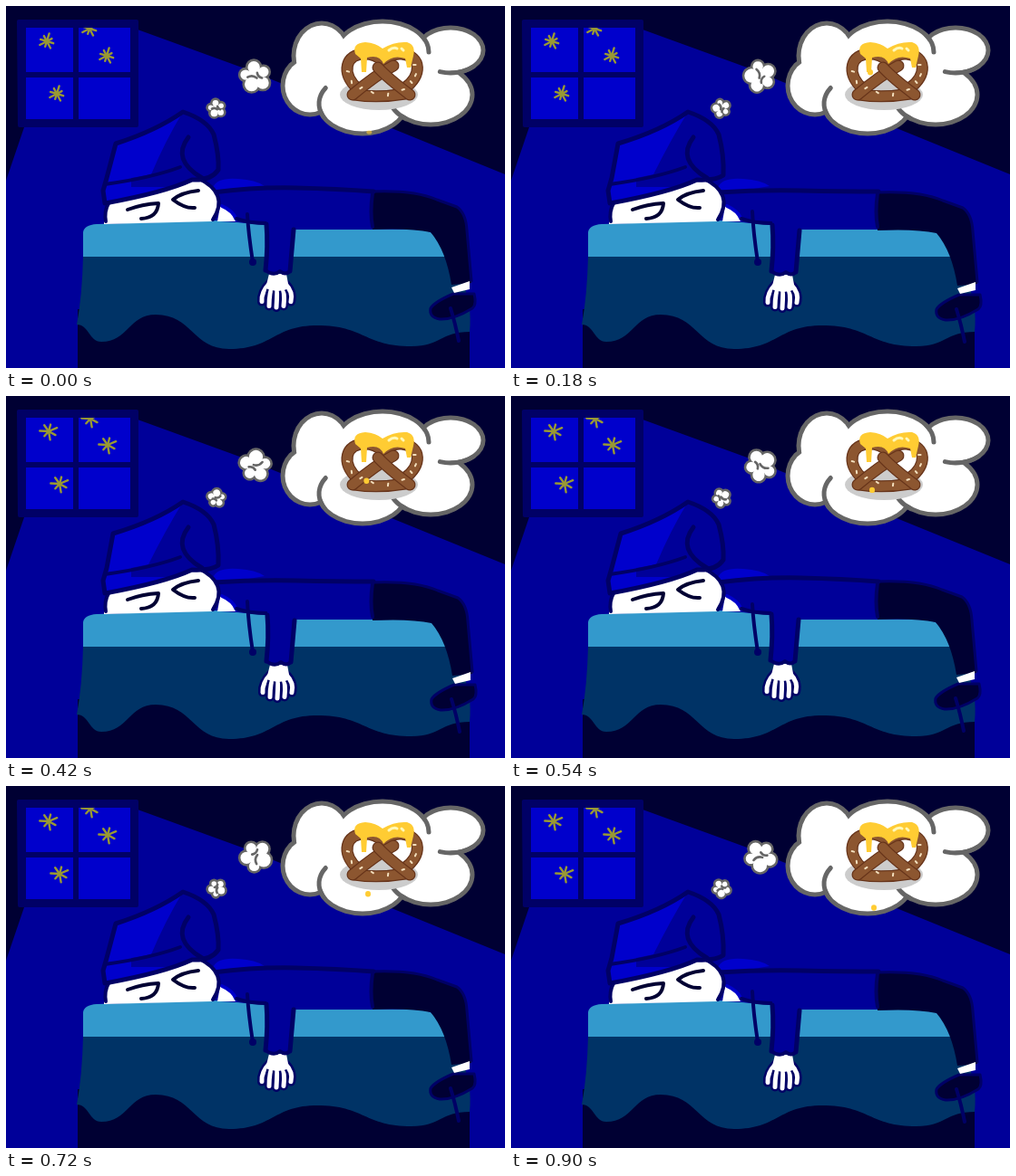
An HTML page with a canvas that plays this animation: 550x400 px, repeating every 0.96 s.

```html
<!DOCTYPE html>
<html>
<head>
<meta charset="utf-8">
<title>Pretzel dream</title>
<style>
html, body { margin: 0; width: 100%; height: 100%; overflow: hidden; background: #003; }
canvas { display: block; }
</style>
</head>
<body>
<canvas id="stage" width="550" height="400"></canvas>
<script>
const ctx = document.getElementById('stage').getContext('2d');
const NIGHT = '#000033', INK = '#000066', ROOM = '#000099', BLUE = '#0000cc';
const WHITE = '#ffffff', GREY = '#666666', CHEESE = '#ffcc33';
const STEP = 60, STEPS = 16, TAU = Math.PI * 2;
ctx.lineCap = ctx.lineJoin = 'round';

function shape(path, fill, stroke, width = 4) {
  const p = new Path2D(path);
  if (fill) { ctx.fillStyle = fill; ctx.fill(p); }
  if (stroke) { ctx.strokeStyle = stroke; ctx.lineWidth = width; ctx.stroke(p); }
}

const line = (path, color = INK, width = 4) => shape(path, null, color, width);

function rect(x, y, w, h, color) {
  ctx.fillStyle = color;
  ctx.fillRect(x, y, w, h);
}

function oval(x, y, rx, ry, color) {
  ctx.fillStyle = color;
  ctx.beginPath();
  ctx.ellipse(x, y, rx, ry, 0, 0, TAU);
  ctx.fill();
}

function moved(x, y, paint) {
  ctx.save();
  ctx.translate(x, y);
  paint();
  ctx.restore();
}

// Overlapping ovals that share one outline
function lobes(list, width) {
  for (const [grow, color] of [[width / 2, GREY], [-width / 2, WHITE]])
    for (const [x, y, rx, ry = rx] of list) oval(x, y, rx + grow, ry + grow, color);
}

function crease([x, y, rx, ry = rx], from, to, width) {
  ctx.strokeStyle = GREY;
  ctx.lineWidth = width;
  ctx.beginPath();
  ctx.ellipse(x, y, rx, ry, 0, from, to);
  ctx.stroke();
}

function star(x, y, late) {
  const spokes = late ? 7 : 8;
  moved(x, y, () => {
    for (let i = 0; i < spokes; i++) {
      const a = 0.3 + late * 0.2 + i / spokes * TAU, r = 7.5 + late + 1.5 * Math.sin(i * 2.4);
      line(`M0 0L${r * Math.cos(a)} ${r * Math.sin(a)}`, '#999933', 2.4);
    }
  });
}

function drawRoom(late) {
  rect(0, 0, 550, 400, NIGHT);
  shape('M145 26L263 69L550 186V400H0V193L20 134Z', ROOM);
  shape('M14 17H144V132H15Z', INK, INK, 4);
  ctx.save();
  ctx.beginPath();
  for (const x of [22, 80]) for (const y of [24, 79]) ctx.rect(x, y, x < 50 ? 52 : 57, y < 50 ? 49 : 46);
  ctx.clip();
  rect(0, 0, 150, 140, BLUE);
  star(45 + 2 * late, 39, late);
  star(92 + late, 25, late);
  star(111 + late, 55 - late, late);
  star(56 + 3 * late, 97, late);
  ctx.restore();
}

// Hem eased from one crest or trough to the next
function hem(keys) {
  let path = '', [px, py] = keys[0];
  for (const [x, y] of keys.slice(1)) {
    const mid = (px + x) / 2;
    path += `C${mid} ${py} ${mid} ${y} ${x} ${y}`;
    [px, py] = [x, y];
  }
  return path;
}

function drawBed() {
  rect(79, 335, 432, 65, NIGHT);
  const folds = hem([[78, 352], [105, 371], [165, 341], [246, 379], [343, 353], [447, 376], [511, 360]]);
  shape(`M85 276Q84 320 78 352${folds}Q514 330 503 305L490 276Z`, '#003366');
  shape('M85 277V250Q86 242 100 241L235 237L330 246L455 247Q472 248 476 259L485 277Z', '#3399cc');
}

function drawLegs() {
  shape('M403 205Q450 203 475 214L497 222Q507 229 508 248L513 306L491 308Q485 270 468 250Q445 245 403 247Z', NIGHT);
  line('M403 205Q450 203 475 214L497 222Q507 229 508 248L513 304', INK, 3);
  shape('M493 318H516Q519 330 514 334Q493 347 478 346Q466 344 468 334Q472 327 493 318Z', NIGHT, INK, 3);
  shape('M491 311L511 304V313L494 317Z', WHITE);
  line('M490 334Q495 350 499 370');
}

function drawTorso(b) {
  shape('M228 201Q232 189 256 191Q275 192 285 199L238 207Z', BLUE);
  shape(`M222 208L290 ${202 + 2 * b}L404 205V247H317L288 241L236 238Z`, ROOM);
  line(`M228 206Q275 ${200 + 3 * b} 320 ${201 + 3 * b}T405 205`, INK, 5);
  line('M404 207Q401 228 404 244');
  shape('M236 221Q251 224 254 238H233Z', WHITE);
  line('M238 221Q250 226 254 236', BLUE);
  line('M254 235Q268 240 287 240');
  line(`M266 ${230 - 3 * b}Q267 250 272 283`);
  oval(272, 283, 4, 4, INK);
}

function drawArm() {
  shape('M287 236L317 241L313 294H287Z', ROOM);
  line('M287 241Q289 265 286 292M317 247L313 293', INK, 5);
  for (let k = -2; k <= 2; k++) {
    const finger = `M${299 + 4 * k} 306Q${299 + 9 * k} 316 ${298 + 8 * k} ${333 - 1.6 * k * k}`;
    line(finger, INK, 10);
    line(finger, WHITE, 5);
  }
  shape('M290 296H309L312 312Q300 318 286 312Z', WHITE);
  line('M286 292Q295 299 302 293Q308 298 313 293');
}

function drawHead(b) {
  shape('M108 241Q107 222 116 213L205 188Q235 198 235 218Q234 230 227 238Z', WHITE);
  line('M211 190Q247 207 228 236');
  line('M110 238Q108 227 113 218');
  line('M134 225Q150 219 168 218Q167 234 149 235M212 204Q193 206 184 214Q197 224 208 223', NIGHT);

  const outline = `M107 204L111 190L${121 - 3 * b} 152Q165 138 195 117Q222 126 229 142Q235 165 234 ${181 + 6 * b}Q226 193 205 192Q175 206 109 218Z`;
  shape(outline, BLUE);
  ctx.save();
  ctx.clip(new Path2D(outline));
  shape(`M${160 - 3 * b} 186Q176 148 195 117H240V200H138V190Z`, ROOM);
  ctx.restore();
  line(outline, INK, 5);
  line('M109 197Q160 190 192 178');
  line('M201 145Q182 170 216 190', INK, 5);
}

function puff(x, y, size, angle) {
  const list = [[0, 0, 10]];
  for (let i = 0; i < 5; i++) {
    const a = i / 5 * TAU - 0.5, d = 10 + i % 2;
    list.push([d * Math.cos(a), d * Math.sin(a), 7 + i % 3]);
  }
  ctx.save();
  ctx.translate(x, y);
  ctx.rotate(angle);
  ctx.scale(size, size);
  lobes(list, 2.6 / size);
  crease(list[1], 1.8, 3, 2.6 / size);
  crease(list[3], 4.2, 5.4, 2.6 / size);
  ctx.restore();
}

function drawCloud() {
  const left = [335, 88, 30, 32], crown = [348, 55, 31, 36], top = [415, 51, 51, 34];
  const right = [490, 49, 36, 25], low = [468, 98, 46, 33], base = [393, 108, 48, 33];
  lobes([left, crown, top, right, low, base, [410, 80, 75, 45]], 5);
  crease(top, -0.6, 0, 5);
  crease(right, 0.8, 1.9, 5);
  crease(low, 2.2, 3, 5);
  crease(base, 2.7, 3.7, 5);
}

function dough(path) {
  line(path, '#663319', 13);
  line(path, '#8c5630', 10.5);
}

function drawPretzel() {
  oval(411, 98, 43, 17, '#cccccc');
  dough('M384 98Q410 102 440 97');
  dough('M388 92C368 73 375 53 395 53Q408 53 415 61Q424 52 436 53C459 55 458 78 440 90');
  dough('M427 66Q408 76 382 98');
  dough('M410 68Q420 79 445 98');
  for (let i = 0; i < 9; i++) {
    const a = -0.4 + i * 0.45, x = 415 + 37 * Math.cos(a), y = 74 + 23 * Math.sin(a);
    line(`M${x} ${y}l${2.5 * Math.cos(i * 2)} ${2.5 * Math.sin(i * 2)}`, '#f3dfbd', 2);
  }
  shape('M385 53Q381 41 396 40Q408 41 415 47Q428 39 442 40Q452 43 449 55L446 68H442L440 58Q426 53 416 64Q412 53 398 57L397 73H392L391 58Z', CHEESE);
  line('M422 49Q427 45 431 47M436 47L438 49', '#fff8b8', 3);
}

function drawDrip(i) {
  const n = i || STEPS, last = n === STEPS;
  ctx.globalAlpha = last ? 0.6 : 1;
  oval(395 + n / 3, 58 + n * 5.1, 3, last ? 2 : 3.2, CHEESE);
  ctx.globalAlpha = 1;
}

function draw(i) {
  const b = (i >> 1) % 2, angle = i / STEPS * TAU;
  drawRoom(i >= 6 ? 1 : 0);
  drawBed();
  moved(b, b, drawLegs);
  drawTorso(b);
  moved(b, b, drawArm);
  drawHead(b);
  puff(275, 77.5, 1, angle);
  puff(232, 113, 0.58, angle);
  drawCloud();
  drawPretzel();
  drawDrip(i);
}

const start = performance.now();
function tick() {
  draw(Math.floor((performance.now() - start) / STEP) % STEPS);
  requestAnimationFrame(tick);
}
tick();
</script>
</body>
</html>
```
